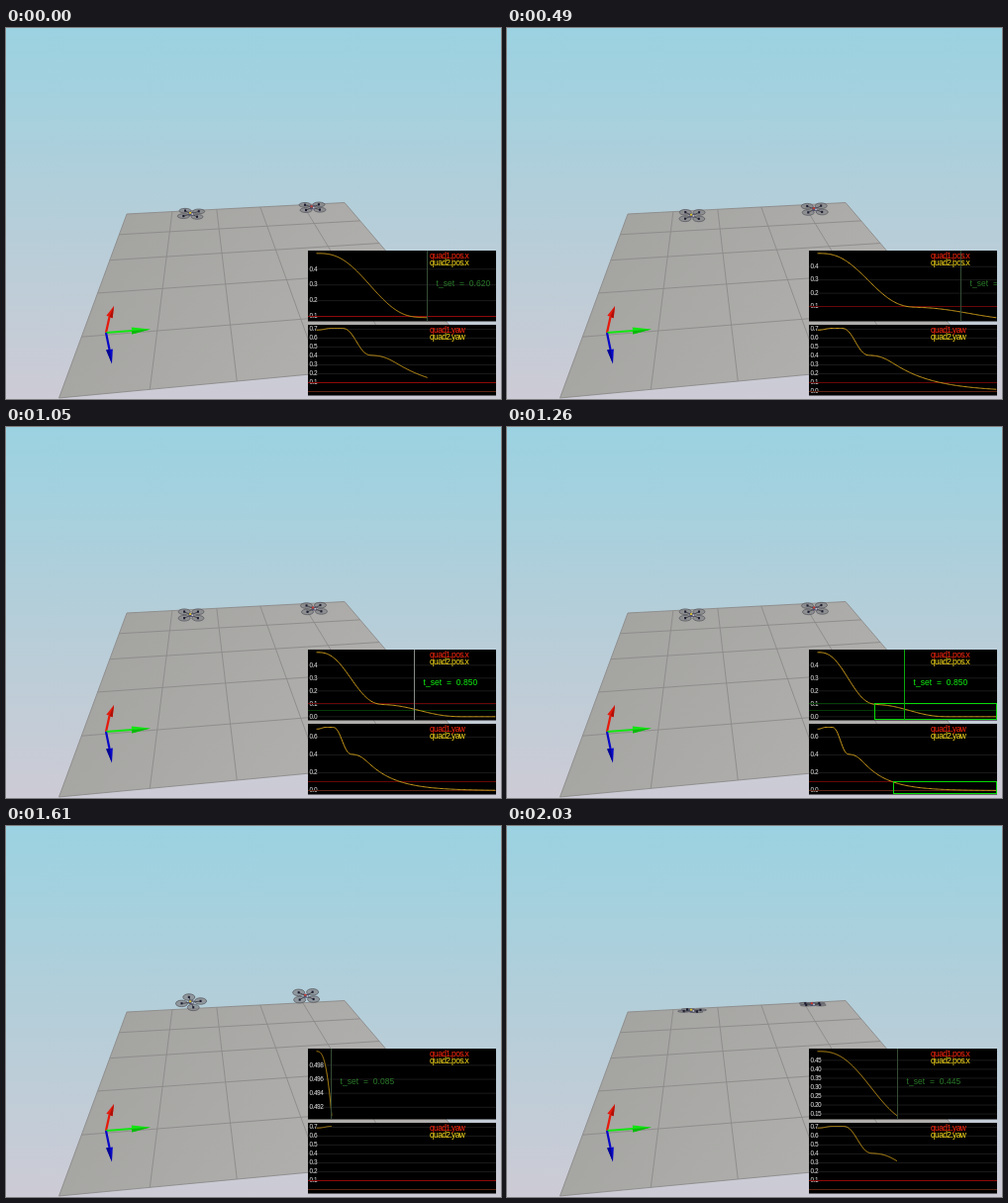
An HTML page with a canvas for the animation above (2100 ms loop, 500x375 px).

```html
<!DOCTYPE html>
<html lang="en">
<head>
<meta charset="utf-8">
<title>Two quadrotors settling</title>
<style>
html, body { margin: 0; width: 100%; height: 100%; overflow: hidden; background: #b9cdd8; }
canvas { display: block; width: 500px; height: 375px; }
</style>
</head>
<body>
<canvas id="stage" width="500" height="375"></canvas>
<script>
const ctx = document.getElementById('stage').getContext('2d');
const STEP = 70, COUNT = 30, RESET = 22, SETTLE = 0.85, LIMIT = 0.1;
const FONT = '"Liberation Sans", Arial, sans-serif';

// Smoothly rises from 0 at a to 1 at b
function ease(t, a, b) {
  const s = Math.min(Math.max((t - a) / (b - a), 0), 1);
  return s * s * s * (10 - 15 * s + 6 * s * s);
}
const bump = (t, mid, width) => Math.exp(-(((t - mid) / width) ** 2));

// The flight: a quick approach, then a slow final drift
const posX = t => .5 - .405 * ease(t, 0, .6) - .095 * ease(t, .5, 1.3);
const yaw = t => .28 + .02 * ease(t, 0, .09) - .3 * ease(t, .138, .31) +
  .41 * (1 + Math.exp((t - .39) / .03)) ** -.125;
const tilt = t => .47 + .38 * bump(t, .2, .09) - .36 * bump(t, .47, .12);

function line(pts, color, width = 1) {
  ctx.beginPath();
  pts.forEach(([x, y]) => ctx.lineTo(x, y));
  ctx.strokeStyle = color;
  ctx.lineWidth = width;
  ctx.stroke();
}

function level(y, color) {
  line([[305, y], [495, y]], color);
}

function poly(pts, color) {
  ctx.beginPath();
  pts.forEach(([x, y]) => ctx.lineTo(x, y));
  ctx.closePath();
  ctx.fillStyle = color;
  ctx.fill();
}

function text(str, x, y, size, color, gap) {
  ctx.font = size + 'px ' + FONT;
  ctx.letterSpacing = gap + 'px';
  ctx.fillStyle = color;
  ctx.fillText(str, x, y);
}

function blend(x0, y0, x1, y1, ...colors) {
  const g = ctx.createLinearGradient(x0, y0, x1, y1);
  colors.forEach((c, i) => g.addColorStop(i / (colors.length - 1), c));
  return g;
}

// Perspective map of the 5 x 5 tile floor
function floor(u, v) {
  const g = .0546, h = -.4973, w = 1 + g * u + h * v;
  return [(122 + (342 * (1 + g) - 122) * u + (53.5 * (1 + h) - 122) * v) / w,
    (188 + (176.5 * (1 + g) - 188) * u + (374 * (1 + h) - 188) * v) / w];
}

function arrow(neck, tip, color, shade) {
  const dx = tip[0] - neck[0], dy = tip[1] - neck[1], n = Math.hypot(dx, dy);
  const nx = -dy / n * 3.4, ny = dx / n * 3.4;
  line([[101, 308], neck], color, 2.2);
  poly([tip, [neck[0] + nx, neck[1] + ny], [neck[0] - nx, neck[1] - ny]], color);
  poly([tip, neck, [neck[0] + nx, neck[1] + ny]], shade);
}

function scene() {
  ctx.fillStyle = blend(0, 0, 0, 375, '#9bd2e1', '#b4ced9', '#cdcbd5');
  ctx.fillRect(0, 0, 500, 375);
  poly([floor(0, 0), floor(1, 0), floor(1, 1), floor(0, 1)],
    blend(90, 200, 310, 360, '#a3a3a0', '#b0afad'));
  for (let i = 0; i <= 5; i++) {
    line([floor(i / 5, 0), floor(i / 5, 1)], '#8c8b89', .9);
    line([floor(0, i / 5), floor(1, i / 5)], '#8c8b89', .9);
  }
  arrow([104.5, 292], [109, 281], '#e51a0c', '#b01008');
  arrow([127, 306], [146, 304.5], '#12e512', '#0cb80c');
  arrow([104.5, 325], [107, 339.5], '#0808c8', '#040490');
}

function rotor(x, y, lean) {
  ctx.beginPath();
  ctx.ellipse(x, y, 6, Math.max(6 * lean, 1), 0, 0, 7);
  ctx.fillStyle = 'rgba(132,133,138,.75)';
  ctx.fill();
  ctx.strokeStyle = '#5b5c62';
  ctx.lineWidth = .8;
  ctx.stroke();
}

function drone(x, y, a, b, lean, dot) {
  const arms = [a, b, [-a[0], -a[1]], [-b[0], -b[1]]]
    .map(p => [x + p[0], y + p[1] * lean]);
  arms.forEach(p => rotor(...p, lean));
  arms.forEach(p => {
    line([[x, y], p], '#4a4a52', 1);
    ctx.fillStyle = '#1c1c30';
    ctx.fillRect(p[0] - 1, p[1] - 1.2, 2, 2.2);
  });
  ctx.fillStyle = '#50506a';
  ctx.fillRect(x - 2.5, y - 2, 5, 4);
  ctx.fillStyle = dot;
  ctx.fillRect(x - 2, y - 1.8, 2.2, 1.8);
  ctx.fillStyle = '#c4c4cc';
  ctx.fillRect(x + .5, y - .5, 1.6, 1.6);
}

function drones(t) {
  const p = posX(t), lean = tilt(t);
  const a = Math.PI / 4 * (1 - yaw(t));
  const c = 9.8 * Math.cos(a), s = 9.8 * Math.sin(a);
  drone(187, 190 - 24 * p, [c, -s], [s, c], lean, '#d8c030');
  drone(311 - 16 * p, 183.5 - 24 * p, [6.5, -7.2], [7.5, 6.2], lean, '#c83c30');
}

function tickStep(span) {
  const e = 10 ** Math.floor(Math.log10(span / 7.5));
  return [1, 2, 5, 10].map(m => m * e).find(s => span / s <= 7.5);
}

function plot(top, fn, isYaw, t, frame) {
  const settled = frame >= 17 && frame < RESET;
  const X = s => 313.6 + s * 180.7 / Math.max(t, 1);
  const data = Array.from({ length: 151 }, (_, i) => [t * i / 150, fn(t * i / 150)]);
  const vals = data.map(d => d[1]);
  const hi = Math.max(...vals), lo = isYaw ? 0 : Math.min(...vals);
  const y0 = top + (isYaw ? 3.5 : 2.8), height = isYaw ? 64 : 65;
  const Y = v => y0 + (hi - v) / (hi - lo) * height;

  ctx.save();
  ctx.beginPath();
  ctx.rect(305, top, 190, 71.5);
  ctx.clip();
  ctx.fillStyle = '#000';
  ctx.fillRect(305, top, 190, 72);

  const step = isYaw ? (t > 1.2 ? .2 : .1) : tickStep(hi - lo);
  const digits = Math.max(1, Math.ceil(-Math.log10(step) - 1e-9));
  const first = isYaw && t < 1 ? 1 : Math.ceil(lo / step - .1);
  for (let k = first; k * step <= hi; k++) {
    const y = Y(k * step);
    if (!isYaw && y < y0 + 5) continue;
    level(y, '#1b1b1b');
    text((k * step).toFixed(digits), 306.5, y + 1.8, 6.5, '#e4e4e4', -.5);
  }

  const limitY = Math.round(Y(LIMIT) - .5) + .5;
  level(limitY, settled && !isYaw ? '#064006' : t > 1 ? '#680707' : '#8e0a0a');
  if (isYaw) level(367.5, '#5c2413');
  else if (t > 1.2) level(Math.round(Y(LIMIT / 2)) + .5, '#063806');

  line(data.map(([s, v]) => [X(s), Y(v)]), '#c8981a');

  if (settled) {
    const x = Math.round(X(isYaw ? .733 : .558)) + .5;
    ctx.strokeStyle = '#08d808';
    ctx.lineWidth = 1;
    ctx.strokeRect(x, limitY, 494.5 - x, top + 70.5 - limitY);
  }

  const label = isYaw ? 'yaw' : 'pos.x';
  text('quad1.' + label, 428, top + 7.5, 8.5, '#ff260e', -.65);
  text('quad2.' + label, 428, top + 15, 8.5, '#ffe01c', -.65);

  if (!isYaw) {
    const set = Math.min(t, SETTLE), x = Math.round(X(set) - .5) + .5;
    const bright = frame >= 13 && frame < RESET;
    line([[x, top], [x, top + 71.5]], settled ? '#0aa80a' : bright ? '#858b85' : '#354c35');
    text('t_set  =  ' + (Math.round(set * 200) / 200).toFixed(3), x + 9, top + 36, 8.5,
      bright ? '#10f010' : '#2a782a', .05);
  }
  ctx.restore();
}

function draw(now) {
  const frame = Math.floor(now / STEP) % COUNT;
  const t = frame < RESET ? .62 + frame * .0625 : .025 + (frame - RESET) * .06;
  scene();
  drones(t);
  plot(225, posX, false, t, frame);
  plot(300, yaw, true, t, frame);
}

const start = performance.now();
function tick() {
  draw(performance.now() - start);
  requestAnimationFrame(tick);
}
tick();
</script>
</body>
</html>
```
